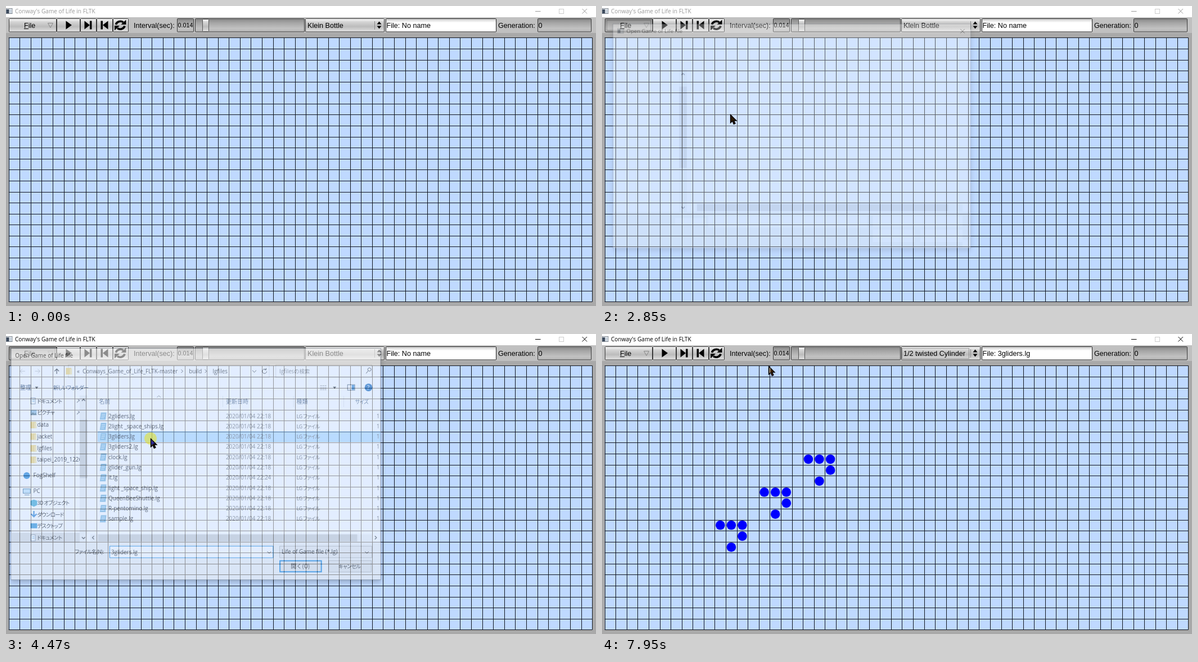
Animation, 1049 px wide and 534 px high, one loop 8 s. Source, as an HTML page:

```html
<!DOCTYPE html>
<html lang="en">
<head>
<meta charset="utf-8">
<title>Game of Life</title>
<style>
html, body { margin: 0; width: 100%; height: 100%; overflow: hidden; background: #fff; }
svg { display: block; width: 1049px; height: 534px; }
text { font: 12.6px "Liberation Sans", Arial, sans-serif; white-space: pre; }
.ui { font: 10.1px "Open Sans", "Noto Sans", sans-serif; }
.jp { font: 10.2px "Noto Sans CJK JP", "Noto Sans CJK", sans-serif; }
.kana { font: 9.6px "Noto Sans CJK JP", "Noto Sans CJK", sans-serif; font-feature-settings: "palt"; letter-spacing: -.7px; }
.invert { mix-blend-mode: difference; }
</style>
</head>
<body>
<svg id="stage" viewBox="0 0 1049 534" xmlns="http://www.w3.org/2000/svg"></svg>
<script>
const LOOP = 8000;
const stage = document.getElementById('stage');

// ---- markup helpers
const rect = (x, y, w, h, fill, more = '') =>
  `<rect x="${x}" y="${y}" width="${w}" height="${h}" fill="${fill}" ${more}/>`;
const line = (d, color = '#000', width = 1, more = '') =>
  `<path d="${d}" fill="none" stroke="${color}" stroke-width="${width}" ${more}/>`;
const shape = (d, fill = '#000') => `<path d="${d}" fill="${fill}"/>`;
const text = (x, y, s, cls = '', fill = '#000', more = '') =>
  `<text x="${x}" y="${y}" class="${cls}" fill="${fill}" ${more}>${s}</text>`;
const group = (id, body, more = '') => `<g id="${id}" ${more}>${body}</g>`;
const repeat = (n, f) => Array.from({ length: n }, (_, i) => f(i)).join('');
const gradient = (id, ...stops) =>
  `<linearGradient id="${id}" x1="0" y1="0" x2="0" y2="1">${stops.map(([at, c]) =>
    `<stop offset="${at}" stop-color="${c}"/>`).join('')}</linearGradient>`;
const box = (x, w, fill, stroke = '#3a3a3a') =>
  rect(x + .5, 22.5, w - 1, 23.5, `url(#${fill})`, `stroke="${stroke}" rx="1"`);
const focusRect = (id, x, w) =>
  group(id, rect(x, 25.5, w, 18, 'none', 'stroke="#555" stroke-dasharray="1 1"'));

// ---- board
const CELL = 19.58, LEFT = 4.7, TOP = 56.4, COLS = 53, ROWS = 24;
const GLIDER = [[0, 0], [1, 0], [2, 0], [2, 1], [1, 2]];

function board() {
  const w = COLS * CELL, h = ROWS * CELL;
  const snap = v => Math.round(v) + .5;
  const columns = repeat(COLS + 1, i => `M${snap(LEFT + i * CELL)} ${TOP}v${h}`);
  const rows = repeat(ROWS + 1, i => `M${LEFT} ${snap(TOP + i * CELL)}h${w}`);
  const cells = repeat(3, k => GLIDER.map(([c, r]) => {
    const x = LEFT + (18 - 4 * k + c + .5) * CELL;
    const y = TOP + (8 + 3 * k + r + .5) * CELL;
    return `<circle cx="${x}" cy="${y}" r="8.3" fill="#00f"/>`;
  }).join(''));
  return rect(LEFT, TOP, w, h, '#bfd9ff') + line(columns + rows, '#10151d') + group('cells', cells);
}

// ---- main window
const appIcon = (x, y) => rect(x + .5, y + .5, 11, 9, '#f4f6f8', 'stroke="#7a828c"') +
  rect(x + 1, y + 2, 5, 7, '#3c4a5c') + rect(x + 7, y + 2, 4, 7, '#c9d3dd');

function titleBar(id, color) {
  return group(id, text(16, 13, "Conway's Game of Life in FLTK", 'ui', color) +
    line('M941 9.5h9.5M1024.5 5l8.5 8.5m0-8.5l-8.5 8.5', color));
}

function toolbar() {
  const icons =
    shape('M106.500 26.500l10.500 7.500l-10.500 7.500z') +
    shape('M139.500 26.500l9.500 7.500l-9.500 7.500zM149 26.500h3.500v15h-3.500z') +
    shape('M181.500 26.500l-9.500 7.500l9.500 7.500zM168.500 26.500h3.500v15h-3.500z') +
    line('M195.500 33a8 7 0 0 1 13-4M211 35.500a8 7 0 0 1-13 4', '#000', 3.6) +
    shape('M213.500 24.500v8.500h-9zM193 43.500v-8.500h9z');
  return box(5, 85, 'raised') + group('filePressed', box(5, 85, 'sunken')) +
    focusRect('fileFocus', 8.5, 78) +
    text(32, 38.5, 'File') + line('M32 40.500h8') +
    line('M74.500 30.500h9l-4.500 8z', '#888') +
    box(90, 42, 'raised') + box(132, 29, 'raised') + box(161, 29, 'raised') + box(190, 28, 'raised') + icons +
    text(227, 38.5, 'Interval(sec):') +
    box(304, 30, 'sunken') + text(305.5, 38, '0.014', '', '#000', 'style="font-size:10.8px"') +
    box(336, 195, 'sunken') + rect(349.5, 23.5, 11, 22, 'url(#raised)', 'stroke="#555" rx="1"') +
    box(532, 141, 'raised') + line('M655.500 27v15', '#888') +
    shape('M659.500 32.500l4-5l4 5zM659.500 35.500l4 5l4-5z') +
    focusRect('choiceFocus', 533.5, 119) + text(536, 38.5, '', '', '#000', 'id="choice"') +
    box(675, 197, 'field', '#222') + text(676.5, 38.5, '', '', '#000', 'id="fileName"') +
    text(875, 38.5, 'Generation:') + box(945, 96, 'sunken') + text(946.5, 38.5, '0');
}

// ---- popup menus
function popup(id, x, y, w, items, marked, step = 17.8) {
  const h = items.length * step + 2;
  const top = y + 1 + marked * step;
  return group(id,
    rect(x + 1, y + 1, w, h, '#222') + rect(x + .5, y + .5, w - 1, h - 1, 'url(#menu)', 'stroke="#555"') +
    rect(x + 2, top, w - 5, step, '#000080', `id="${id}Mark"`) +
    items.map((s, i) => text(x + 4, y + 14 + i * step, s, '', '#000', `id="${id}${i}"`)).join(''));
}
const CHOICES = ['Torus', 'Klein Bottle', '1/2 twisted Cylinder', '1/3 twisted Torus', 'closed Rectangle'];
const FILE_ITEMS = ['Open', 'Save', 'Quit'];

// ---- open dialog
const FILES = ['2gliders', '2light _space_ships', '3gliders', '3gliders2', 'clock', 'glider_gun',
  'it', 'light _space_ship', 'QueenBeeShuttle', 'R-pentomino', 'sample'];
const ROW = 18.64, LIST_Y = 144.4;

const folder = (x, y) => rect(x, y - 6, 10, 12, '#f6d673') + rect(x + 7, y - 4, 4, 10, '#fbe6a4');
const navRow = (y, label, icon, cls = 'ui', x = 50) => icon + text(x, y + 3.5, label, cls, '#111');
const dot = (x, y, color, r = 6) => `<circle cx="${x}" cy="${y}" r="${r}" fill="${color}"/>`;
const pin = y => line(`M122 ${y + 3}l3-3m-1-3l4 4m-3-1l3-3`, '#777', 1.3);
const page = y => rect(38.5, y - 5.5, 8, 11, '#fff', 'stroke="#789"') + line(`M41 ${y - 2}h4m-4 3h4`, '#59c');

function navigation() {
  const folders = [['data', 160.7], ['jacket', 181.6], ['lgfiles', 203], ['taipei_2019_1226', 223.9]];
  return rect(3, 356, 124, 18, '#d9d9d9') +
    navRow(117, 'ドキュメント', page(117), 'kana') + pin(117) +
    navRow(138.3, 'ピクチャ', rect(38, 133.5, 11, 9, '#8bb7d8') + shape('M38 142.500l4-5l3 3l2-2l2 4z', '#467'), 'kana') + pin(138.3) +
    `<g clip-path="url(#navClip)">${folders.map(([s, y]) => navRow(y, s, folder(38, y))).join('')}</g>` +
    navRow(252.4, 'FogShelf', dot(31, 252.4, '#1b7fd0'), 'ui', 43) +
    navRow(280.9, 'PC', rect(24.5, 276.5, 13, 8, '#bfe3f7', 'stroke="#368"') + line('M27 287.500h9', '#368'), 'ui', 43) +
    navRow(302.3, '3D オブジェクト', shape('M38 298l6-2l6 2v8l-6 3l-6-3z', '#3aa5cf'), 'kana') +
    navRow(323.2, 'ダウンロード', line('M44 316.500v10m-5-4.500l5 5l5-5', '#2a7fd0', 2.4), 'kana') +
    navRow(344, 'デスクトップ', rect(38, 339, 12, 9, '#2a8fd4'), 'kana') +
    navRow(365.4, 'ドキュメント', page(365.4), 'kana');
}

function fileList() {
  return FILES.map((name, i) => {
    const y = LIST_Y + i * ROW, base = y + 3.6;
    const time = name === 'it' ? '22:24' : '22:18';
    return shape(`M165.500 ${y - 6.5}h10l-1.500 13h-10.500z`, '#78b4da') +
      line(`M167 ${y - 3}h6m-6.500 3h6m-6.500 3h5`, '#d9eefb') +
      text(179, base, name + '.lg', 'ui', '#111') +
      text(392, base, '2020/01/04 ' + time, 'ui', '#666') +
      text(520, base, 'LG ファイル', 'kana', '#666') + text(665, base, '1', 'ui', '#666');
  }).join('');
}

function addressBar() {
  const ink = '#333';
  return rect(106.5, 51.5, 364, 23, '#fff', 'stroke="#d9d9d9"') + rect(482.5, 51.5, 174, 23, '#fff', 'stroke="#d9d9d9"') +
    line('M28 63h-9m4-4l-4 4l4 4M46 63h9m-4-4l4 4l-4 4', '#bbb') +
    line('M85.500 68v-9m-4 4l4-4l4 4', ink, 1.3) + folder(102, 63) +
    text(122, 66.5, '«', 'ui', ink) + text(132, 66.5, 'Conways_Game_of_Life_FLTK-master', 'ui', ink) +
    text(325, 66.5, 'build', 'ui', ink) + text(368, 66.5, 'lgfiles', 'ui', ink) +
    line('M311 60l3 3l-3 3M354 60l3 3l-3 3M440 61.500l3.500 3.500l3.500-3.500', ink) +
    line('M465 60.500a4 4 0 1 0 1 3m-1-6v3h-3', ink) +
    text(489, 66.5, 'lgfilesの検索', 'jp', '#777', 'style="font-size:9.6px"') +
    line('M650 62a3 3 0 1 1 .1 .1l-4 5', ink) +
    text(19, 96.2, '整理', 'jp', '#1e395b') + shape('M46 91h6l-3 4z', ink) +
    text(79, 96, '新しいフォルダー', 'kana', '#1e395b') +
    line('M563 89.500h3m1 0h3m1 0h3m-11 4h3m1 0h3m1 0h3m-11 3h3m1 0h3m1 0h3', '#777') + shape('M586 91h6l-3 4z', ink) +
    rect(612.5, 87.5, 13, 10, '#fff', 'stroke="#456"') + rect(620, 88, 5, 9, '#3a8ad0') +
    dot(650.5, 92.5, '#1565b8', 7) + text(648, 96.5, '?', 'ui', '#fff', 'font-weight="700"');
}

function dialog() {
  const up = 'M131 117l3-3l3 3', down = 'M131 364l3 3l3-3';
  const headings = text(162, 121.8, '名前', 'jp', '#4c607a') + text(392, 121.8, '更新日時', 'jp', '#4c607a') +
    text(520, 121.8, '種類', 'jp', '#4c607a') + text(626, 121.8, 'サイズ', 'kana', '#4c607a') +
    line('M267 110.500l3.500-3l3.500 3', '#777') + line('M386.500 108v20m128-20v20m91-20v20', '#e5e5e5');
  const footer = text(118, 394.4, 'ファイル名(N):', 'kana', '#111') +
    rect(181.5, 380.5, 296, 21, '#fff', 'stroke="#0078d7"') + line('M467 390l3.500 3.500l3.500-3.500', '#333') +
    rect(489.5, 380.5, 167, 21, '#e9e9e9', 'stroke="#adadad"') +
    text(493, 394.4, 'Life of Game file (*.lg)', 'ui', '#111') + line('M644 390l3.500 3.500l3.500-3.500', '#333') +
    rect(490, 407, 75, 20, '#e1e1e1', 'stroke="#0078d7" stroke-width="2"') +
    text(527, 421, '開く(O)', 'jp', '#111', 'text-anchor="middle"') +
    rect(578.5, 406.5, 77, 21, '#e1e1e1', 'stroke="#adadad"') +
    text(616, 421, 'キャンセル', 'kana', '#111', 'text-anchor="middle"');
  const blanks = rect(119, 385, 58, 13, '#fff') + rect(181, 381, 298, 22, '#fff') + rect(489, 381, 168, 21, '#fff') +
    rect(489, 407, 79, 23, '#fff') + rect(578, 407, 79, 23, '#fff') + rect(657, 426, 14, 14, '#fff');
  return group('dialog',
    rect(2.5, 21.5, 670, 420, '#fff', 'stroke="#5c6470" filter="url(#shadow)"') +
    rect(3, 374, 669, 67, '#f0f0f0') +
    group('heading', appIcon(11, 29.5) + text(28, 38.3, 'Open Game of Life file', 'ui') +
      line('M653 31l8 8m0-8l-8 8')) +
    group('closingHeading', text(10, 38, 'Open Game of Life file', 'ui')) +
    group('chrome', addressBar() + footer) +
    group('blanks', blanks) +
    group('rows', headings +
      rect(160.5, LIST_Y + 2 * ROW - 9, 511, 18, '#e5f3ff', 'id="row"') + fileList() + navigation()) +
    rect(127, 107, 14, 267, '#f0f0f0') + rect(127, 139, 14, 152, '#cdcdcd', 'id="thumb"') +
    line(up + down, '#444', 1.6) +
    rect(160, 359, 497, 13, '#f0f0f0') + rect(160, 359, 470, 13, '#cdcdcd') +
    group('sideArrows', rect(146, 359, 14, 13, '#f0f0f0') + line('M153 362l-3 3l3 3M662 362l3 3l-3 3', '#444', 1.4)) +
    text(184, 394.8, '3gliders.lg', 'ui', '#111', 'id="entry"'));
}

const ARROW = 'M.5 .5V15l3.400-3.200L6.300 17.500l2.700-1.200L6.500 11H11z';

stage.innerHTML = `<defs>
  ${gradient('raised', [0, '#fafafa'], [.25, '#d4d4d4'], [.6, '#bcbcbc'], [1, '#e2e2e2'])}
  ${gradient('sunken', [0, '#858585'], [.3, '#a4a4a4'], [.75, '#c2c2c2'], [1, '#b4b4b4'])}
  ${gradient('field', [0, '#c8c8c8'], [.3, '#fff'], [1, '#fff'])}
  ${gradient('menu', [0, '#f4f4f4'], [.2, '#cfcfcf'], [.5, '#bdbdbd'], [.8, '#c6c6c6'], [1, '#eee'])}
  <clipPath id="navClip"><rect x="3" y="100" width="124" height="274"/></clipPath>
  <filter id="shadow" x="-5%" y="-5%" width="110%" height="112%">
    <feDropShadow dx="0" dy="4" stdDeviation="5" flood-opacity=".4"/></filter></defs>` +
  rect(0, 0, 1049, 534, '#a9a9a9') + rect(0, 0, 1049, 20, '#fff') + rect(0, 20, 1049, 28, '#c0c0c0') +
  appIcon(-.5, 4) + titleBar('inactive', '#999') + titleBar('active', '#000') +
  rect(983.5, 5.5, 8, 8, 'none', 'stroke="#ccc"') +
  toolbar() + board() +
  popup('fileMenu', 5, 47, 85, FILE_ITEMS, 0, 18) +
  popup('choiceMenu', 532, 6, 141, CHOICES, 1) +
  dialog() +
  '<circle id="press" r="11" fill="#e8e21e" fill-opacity=".55"/>' +
  `<path id="arrowFill" class="invert" d="${ARROW}" fill="#fff"/>` +
  `<path id="arrowEdge" d="${ARROW}" fill="none" stroke="#000" stroke-width="1.300"/>`;

const ids = {};
stage.querySelectorAll('[id]').forEach(e => ids[e.id] = e);
const show = (id, on) => ids[id].setAttribute('display', on ? 'inline' : 'none');
const set = (id, attrs) => { for (const k in attrs) ids[id].setAttribute(k, attrs[k]); };

// ---- pointer: start, end, number of steps, then [progress, x, y] stops
const MOVES = [
  [70, 830, 11, [0, 846, 514], [.2, 640, 385], [.5, 330, 185], [.8, 145, 66], [1, 99, 35]],
  [900, 1050, 3, [0, 88, 29], [.5, 76, 24], [1, 82, 27]],
  [1600, 1990, 6, [0, 82, 29], [.6, 71, 46], [1, 66, 53]],
  [2460, 3250, 11, [0, 70, 56], [.2, 145, 125], [.4, 221, 189], [.8, 249, 205], [1, 251, 203]],
  [3320, 3700, 6, [0, 252, 201], [1, 257, 189]],
  [3850, 3930, 2, [0, 257, 187], [1, 257, 186]],
  [4160, 4940, 11, [0, 257, 186], [.6, 257, 186], [.7, 295, 171], [.9, 421, 126], [1, 497, 106]],
  [5010, 5640, 9, [0, 555, 88], [.5, 674, 50], [1, 648, 35]],
  [6100, 6400, 5, [0, 642, 37], [.5, 618, 47], [1, 600, 56]],
  [7410, 7950, 8, [0, 590, 57], [.3, 500, 62], [.75, 345, 61], [1, 296, 57]],
];
const PRESSES = [[1300, 1600], [2290, 2460], [4160, 4545], [5870, 6100], [7260, 7410]];

function pointerAt(t) {
  const move = MOVES.filter(m => t >= m[0]).pop();
  if (!move) return null;
  const [start, end, steps, ...stops] = move;
  const last = steps - 1;
  const p = Math.min(last, Math.floor((t - start) / (end - start) * last + .25)) / last;
  const k = Math.max(1, stops.findIndex(s => s[0] >= p - 1e-6));
  const [a, b] = [stops[k - 1], stops[k]];
  const f = (p - a[0]) / (b[0] - a[0]);
  return [a[1] + (b[1] - a[1]) * f, a[2] + (b[2] - a[2]) * f];
}

// [time, opacity, scale] of the dialog
const DIALOG = [[0, 0, 1], [2850, .3, .95], [2925, .75, .985], [3000, 1, 1], [4390, .8, .992], [4465, .55, .981], [4545, 0, 1]];

function draw(t) {
  const within = (a, b) => t >= a && t < b;
  const pointer = pointerAt(t);
  const [x, y] = pointer || [0, 0];
  const at = `translate(${Math.round(x)} ${Math.round(y)})`;
  for (const id of ['arrowFill', 'arrowEdge', 'press']) { show(id, pointer); set(id, { transform: at }); }
  show('press', PRESSES.some(p => within(...p)));

  const active = within(1300, 2685) || t >= 4390;
  show('active', active);
  show('inactive', !active);
  show('filePressed', within(1300, 4625));
  show('fileFocus', within(1300, 5870));
  show('choiceFocus', t >= 7410);
  show('cells', t >= 4625);
  ids.fileName.textContent = t >= 4625 ? 'File: 3gliders.lg' : 'File: No name';
  ids.choice.textContent = CHOICES[t >= 7410 ? 2 : 1];

  show('fileMenu', within(1300, 2460));
  const onOpen = y > 47;
  show('fileMenuMark', onOpen);
  set('fileMenu0', { fill: onOpen ? '#fff' : '#000' });

  show('choiceMenu', within(5870, 7410));
  const marked = y > 42 ? 2 : 1;
  set('choiceMenuMark', { y: 7 + marked * 17.8 });
  CHOICES.forEach((_, i) => set('choiceMenu' + i, { fill: i === marked ? '#fff' : '#000' }));

  const [, opacity, scale] = DIALOG.filter(d => t >= d[0]).pop();
  const loaded = t >= 3250, listed = t >= 3320, picked = t >= 4160, closing = t >= 4390;
  show('dialog', opacity > 0);
  set('dialog', { opacity, transform: `translate(337 231) scale(${scale}) translate(-337 -231)` });
  show('heading', !closing);
  show('closingHeading', closing);
  show('blanks', !loaded);
  show('chrome', loaded);
  show('rows', listed);
  show('sideArrows', listed);
  show('entry', picked);
  show('row', picked || t >= 3620);
  set('row', picked ? { fill: '#b5ddff', stroke: '#8cc9ff' } : { fill: '#e5f3ff', stroke: 'none' });
  set('thumb', listed ? { y: 151, height: 106 } : { y: 139, height: 152 });
}

function tick() {
  draw(performance.now() % LOOP);
  requestAnimationFrame(tick);
}
tick();
</script>
</body>
</html>
```
